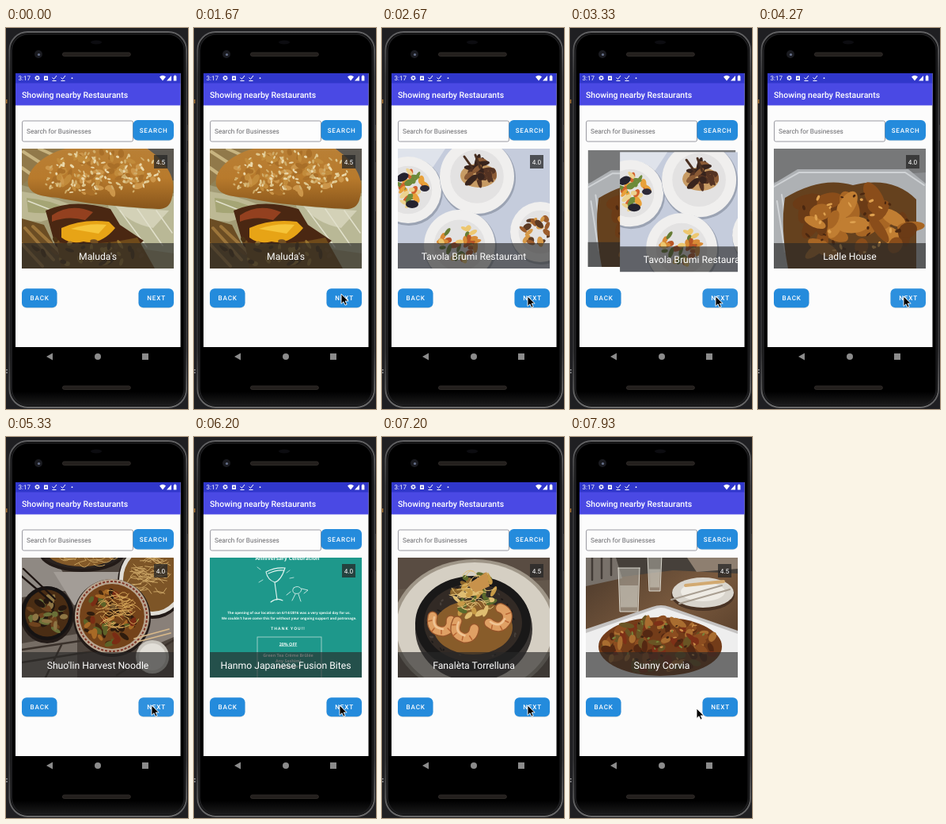
Animation, 230 px wide and 480 px high, one loop 8000 ms. Source, as an HTML page:

```html
<!DOCTYPE html>
<html lang="en">
<head>
<meta charset="utf-8">
<title>Nearby restaurants</title>
<style>
html, body { margin: 0; width: 100%; height: 100%; overflow: hidden; background: #1f1f22; }
svg { display: block; width: 230px; height: 480px; }
text { font-family: Roboto, Inter, sans-serif; text-rendering: geometricPrecision; }
.label { font-size: 8.1px; font-weight: 500; letter-spacing: .85px; fill: #fff; text-anchor: middle; }
.name { font-size: 12.2px; fill: #fff; text-anchor: middle; }
.rate { font-size: 8.2px; fill: #fff; text-anchor: middle; }
.flyer text { font-family: "Open Sans", sans-serif; font-weight: 700; fill: #eefaf6; text-anchor: middle; }
</style>
</head>
<body>
<svg viewBox="0 0 230 480">
  <defs>
    <clipPath id="list"><rect x="20" y="100" width="192" height="300"/></clipPath>
    <clipPath id="photo"><rect width="192" height="151"/></clipPath>
    <filter id="soft" x="0" y="0" width="1" height="1"><feGaussianBlur stdDeviation=".55"/></filter>
    <linearGradient id="bun" x2="0" y2="1">
      <stop stop-color="#b98036"/><stop offset=".5" stop-color="#b87a2c"/><stop offset="1" stop-color="#87551b"/>
    </linearGradient>
    <linearGradient id="wood" x2="1" y2="1">
      <stop stop-color="#48372a"/><stop offset=".5" stop-color="#7a5a3e"/><stop offset="1" stop-color="#4b3423"/>
    </linearGradient>
    <linearGradient id="rim" x2="0" y2="1">
      <stop stop-color="#626264"/><stop offset=".12" stop-color="#3b3b3d"/>
      <stop offset=".85" stop-color="#353537"/><stop offset="1" stop-color="#6a6a6b"/>
    </linearGradient>
    <linearGradient id="chin" x2="0" y2="1"><stop stop-color="#000"/><stop offset="1" stop-color="#1c1c1d"/></linearGradient>
  </defs>

  <rect width="230" height="480" fill="#1f1f22"/>
  <path d="M0 90h1.6v5h-1.6z" fill="#9a6a30"/>
  <path d="M0 430h2v1.5h-2zM0 433.5h2v1.5h-2z" fill="#8a8a8c"/>
  <path d="M227.5 122h2v20h-2zM227.5 169h2v62h-2z" fill="#48484b"/>
  <rect x="4.5" y="5" width="223.5" height="473" rx="23" fill="#000" stroke="url(#rim)" stroke-width="2"/>
  <path d="M7 458H226Q224 475 205 476H28Q9 475 7 458Z" fill="url(#chin)"/>
  <rect x="7" y="7.5" width="218.5" height="468" rx="21" fill="none" stroke="#1d1d1f" stroke-width="2"/>
  <ellipse cx="114" cy="18" rx="7" ry="2.5" fill="#0c0c10"/>
  <circle cx="41" cy="33" r="5" fill="#1a1b20"/><circle cx="41.5" cy="33.5" r="1.6" fill="#66718a"/>
  <g fill="#231f1d" stroke="#393431" stroke-width=".7">
    <rect x="71.4" y="30.9" width="86" height="4.6" rx="2.3"/><rect x="71.4" y="450.9" width="86" height="4.6" rx="2.3"/>
  </g>

  <rect x="12" y="57" width="208.5" height="345" fill="#fcfcfc"/>
  <rect x="12" y="57" width="208.5" height="13" fill="#3037cb"/>
  <rect x="12" y="69.5" width="208.5" height="28" fill="#4a49e4"/>
  <g fill="#fff">
    <text x="15.5" y="66.3" font-size="8">3:17</text>
    <circle cx="39.5" cy="63" r="2.1" fill="none" stroke="#fff" stroke-width="1.9" stroke-dasharray="1.6 .3"/>
    <path d="M48 60.5h5v5.5h-5zM49.5 62.2v2h2v-2z" fill-rule="evenodd"/>
    <path d="M58.5 62.5l2 2 3.5-4.5M58.5 66.5h5M69.5 62.5l2 2 3.5-4.5M69.5 66.5h5" fill="none" stroke="#fff"/>
    <circle cx="83.5" cy="63.2" r=".9"/>
    <path d="M194 61.5Q198 58 202 61.5L198 66.5zM203 66.5h6v-6.5zM211.8 60.5h1v-1h1.6v1h1v6h-3.6z"/>
    <text x="20" y="87.6" font-size="10.5" font-weight="500">Showing nearby Restaurants</text>
  </g>

  <rect x="20.5" y="117" width="140" height="26" rx="2" fill="#fdfdfd" stroke="#9a9aa2"/>
  <text x="26" y="133.2" font-size="8.25" fill="#68686c">Search for Businesses</text>
  <g id="buttons"></g>
  <g clip-path="url(#list)" id="cards"></g>

  <g fill="#8b8b8b">
    <path d="M51 414l8-4.5v9z"/><circle cx="116" cy="414" r="4"/><rect x="172" y="410" width="8" height="8"/>
  </g>
  <path id="cursor" d="M0 0V12.5L3 9.8L5 14.2L7.2 13.2L5.2 9H9.2Z" fill="#000" stroke="#fff" stroke-width=".9" stroke-linejoin="round"/>
</svg>
<script>
const $ = id => document.getElementById(id);
const LOOP = 8000, SWIPE = 200, W = 192, H = 151;

const ell = (x, y, rx, ry, fill, extra = '') =>
  `<ellipse cx="${x}" cy="${y}" rx="${rx}" ry="${ry}" fill="${fill}" ${extra}/>`;
const shape = (d, fill) => `<path d="${d}" fill="${fill}"/>`;
const line = (d, color, width) =>
  `<path d="${d}" fill="none" stroke="${color}" stroke-width="${width}" stroke-linecap="round"/>`;
const back = fill => `<rect width="${W}" height="${H}" fill="${fill}"/>`;
const random = seed => {
  let s = seed * 99991;
  return () => (s = s * 16807 % 2147483647) / 2147483647;
};

// Random points inside an ellipse, each drawn by one callback.
function scatter(seed, n, cx, cy, rx, ry, draw) {
  const r = random(seed);
  let out = '';
  for (let i = 0; i < n; i++) {
    const a = r() * 2 * Math.PI, d = Math.sqrt(r());
    out += draw(cx + rx * d * Math.cos(a), cy + ry * d * Math.sin(a), r, i);
  }
  return out;
}
const bits = (seed, n, cx, cy, rx, ry, size, colors) =>
  scatter(seed, n, cx, cy, rx, ry, (x, y, r, i) =>
    ell(x, y, size * (.6 + r() * .7), size * (.35 + r() * .3), colors[i % colors.length],
      `transform="rotate(${r() * 180} ${x} ${y})"`));
const strands = (seed, n, cx, cy, rx, ry, color) =>
  scatter(seed, n, cx, cy, rx, ry, (x, y, r) =>
    line(`M${x - 7} ${y + r() * 8 - 4}Q${x} ${y + r() * 24 - 12} ${x + 7} ${y + r() * 8 - 4}`, color, 1));
const plate = (x, y, rx, ry = rx) =>
  ell(x + 1, y + 2, rx + 1, ry + 1, '#9ba3b3') + ell(x, y, rx, ry, '#f0efee') + ell(x, y, rx * .72, ry * .72, '#e3e2e2');

const burger = () => back('#8f8156') +
  shape('M0 0H66L14 34L0 46Z', '#91794a') + line('M2 4L30 22M22 0L40 8M0 24L14 34', '#c8b480', 4) +
  shape('M150 0H192V40H165Z', '#5b5750') + line('M152 -2L168 12', '#a98a72', 6) +
  shape('M0 46L60 62L192 56V151H0Z', '#a39c76') +
  shape('M0 54Q30 58 60 70L52 84L24 92L0 90Z', '#bdb994') + shape('M6 62Q34 64 58 76Q36 84 8 80Z', '#a5a575') +
  shape('M108 68L192 60V132L150 126Q116 104 108 68Z', '#b9b896') +
  shape('M118 72Q150 76 186 78L166 100Q134 94 118 72Z', '#d3d1b7') +
  line('M124 78L158 124M146 76L178 122M170 78L190 106M8 66L44 80', '#e1e0cb', 1.5) +
  shape('M30 78Q66 62 112 76L124 96L154 116L140 128H44Z', '#4a2712') +
  shape('M38 84Q62 68 90 80L80 90Q58 84 38 92Z', '#93401f') +
  shape('M50 100Q76 88 110 92L118 100Q100 122 78 117Q62 121 50 112Z', '#e7a416') +
  shape('M62 101Q86 93 107 96L97 107Z', '#f6c53a') +
  shape('M0 88L28 96L56 151H0Z', '#6b4d24') + line('M4 100L40 140M14 98L50 132M0 120L26 148', '#9c753a', 4) +
  shape('M44 118Q90 124 146 112L168 151H50Z', '#6f4a1a') + bits(4, 35, 80, 132, 78, 20, 5, ['#4c3214', '#9a742f', '#755022']) +
  shape('M8 46C4 24 34 2 66 -2H154C178 10 194 34 191 52C190 68 186 76 172 76C136 74 82 70 46 62C24 60 12 58 8 46Z', 'url(#bun)') +
  bits(6, 80, 98, 30, 74, 26, 6, ['#c28b3b', '#a96f28', '#cc964a']) +
  bits(5, 125, 98, 31, 80, 28, 2.6, ['#dfc78e', '#d0ac69', '#ead8ab']);

const plates = () => back('#c5ccdc') +
  shape('M0 0H60L20 60H0Z', '#dfe3eb') + plate(13, 52, 42) + plate(100, 35, 47) + plate(78, 122, 45) + plate(180, 105, 38) +
  bits(7, 28, 18, 52, 20, 23, 6, ['#e8a13a', '#d2622c', '#ecd28e', '#6d8a3a']) +
  ell(6, 36, 8, 5, '#24222e', 'transform="rotate(-25 6 36)"') + ell(18, 70, 8, 5, '#24222e') +
  ell(34, 50, 6, 4, '#2c2937') +
  ell(102, 34, 23, 15, '#c79b64') + bits(8, 20, 104, 28, 22, 14, 8, ['#543323', '#38241d', '#8a5a35']) +
  line('M84 10L94 24M98 8L104 24', '#4a3021', 3) +
  bits(9, 32, 78, 118, 25, 22, 6, ['#d88b36', '#b95526', '#edc76f', '#667c33']) +
  bits(10, 18, 178, 104, 20, 18, 6, ['#9b5c2c', '#d69a49', '#5b3a24']);

const chicken = () => back('#8b8d90') +
  shape('M0 0H192V30L0 42Z', '#777879') + shape('M0 44L30 26H170L192 44V151H0Z', '#aeb1b4') +
  line('M0 48L32 30H166L190 46M4 66L14 130M10 58L22 140', '#d0d3d6', 2) +
  shape('M14 62Q60 34 100 46Q150 34 180 64V151H18Q8 100 14 62Z', '#65411e') +
  bits(12, 34, 98, 96, 76, 42, 17, ['#a86624', '#8a4d1a', '#c17e32', '#6b3b16']) +
  bits(13, 40, 98, 92, 72, 42, 3, ['#dea14f', '#4a2710']);

const bowl = (x, y, rx, ry, rim, soup) =>
  ell(x, y + 2, rx + 2, ry + 2, '#221a17') + ell(x, y, rx, ry, rim) + ell(x, y, rx * .87, ry * .87, soup);
const noodles = () => back('#4d443d') +
  shape('M0 0H40L66 40L0 50Z', '#8f8983') + shape('M40 18H130L120 40L66 60Z', '#a39d97') +
  shape('M0 108L70 96V151H0Z', '#766d65') + shape('M128 72L192 66V100L150 118Z', '#898079') +
  line('M0 116L80 104M0 132L90 118M30 151L50 110M120 148L192 104', '#3a312b', 2.5) +
  bowl(76, -8, 52, 22, '#2a2320', '#845a29') + strands(21, 24, 82, -1, 34, 9, '#c7a05e') +
  bowl(165, 28, 42, 45, '#e0ddd6', '#4a3423') +
  ell(165, 28, 37, 40, '#7d5527') + strands(22, 55, 163, 24, 23, 27, '#cba565') +
  bowl(32, 70, 32, 34, '#161313', '#4a2d14') +
  bits(23, 36, 32, 72, 22, 24, 6, ['#24170f', '#6f431e', '#6a7038', '#8d7544']) +
  line('M2 14L42 52M-2 22L38 56', '#1c1310', 2.4) +
  bowl(114, 74, 47, 47, '#b8a48f', '#74431a') +
  ell(114, 74, 44, 44, 'none', 'stroke="#803526" stroke-width="2" stroke-dasharray="3 2"') +
  bits(24, 55, 110, 76, 34, 34, 6, ['#44270f', '#a86a26', '#5d6228', '#7a2c14', '#2f1c0e']) +
  strands(25, 60, 122, 68, 22, 24, '#d0a156') +
  line('M142 102L186 90M146 106L188 95', '#d9b98a', 1.7) + ell(165, 125, 21, 21, '#c9c5bd') + ell(165, 125, 17, 17, '#e2dfd8');

const flyerText = (x, y, size, text, extra = '') => `<text x="${x}" y="${y}" font-size="${size}" ${extra}>${text}</text>`;
const flyer = () => `<g class="flyer">` + back('#1e988b') +
  flyerText(98, 3.2, 6.7, 'Anniversary Celebration') +
  line('M71 18Q82 12 95 13Q90 29 82 31Q73 28 71 18M74 20Q84 15 93 16M82 31L85 53M77 56Q85 50 92 54', '#e6f6f2', 1.1) +
  line('M97 19l4-3M101 26l5-1M64 15l-4-3M67 28l-5 3', '#e6f6f2', .7) +
  line('M106 38q6-4 10 2q-2 7-9 5q-4-3-1-7M116 39l8 2l-5 4M108 46l-4 8M112 46l3 9M102 43l-5 4', '#d7eee9', .9) +
  flyerText(100, 70.5, 4.45, 'The opening of our location on 6/14/2016 was a very special day for us.') +
  flyerText(100, 77.8, 4.45, 'We couldn\'t have come this far without your ongoing support and patronage.') +
  flyerText(99, 91, 5, 'THANK YOU!!', 'letter-spacing="1"') +
  `<rect x="60" y="100" width="81" height="60" fill="none" stroke="#b8ddd5" stroke-width=".8"/>` +
  flyerText(99, 110.5, 5.4, '20% OFF', 'text-decoration="underline"') +
  flyerText(99, 125, 5.3, 'Green Tea Crème Brûlée') + flyerText(99, 132, 5.3, 'Any Sashimi') +
  flyerText(99, 139, 5.3, 'Any Dessert') + '</g>';

const prawn = (x, y, turn) => `<g transform="translate(${x} ${y}) rotate(${turn})">` +
  line('M-11 -9Q-15 9 2 10Q13 8 12 -4', '#96542a', 13) + line('M-11 -9Q-15 9 2 10Q13 8 12 -4', '#dfa064', 10.5) +
  line('M-12 -4l-4 1M-9 6l-3 4M0 8v5M8 6l4 4', '#b96634', 1.5) + line('M-9 -8Q-12 6 2 7', '#f0c494', 2.5) + '</g>';
const skillet = () => back('#63574b') +
  shape('M0 0H192V28L0 40Z', '#594c42') + ell(97, 88, 104, 86, '#9f9688') + ell(97, 88, 99, 82, '#d5cfc3') +
  ell(96, 90, 74, 66, '#3a3634') + ell(95, 83, 73, 60, '#191818') + ell(95, 82, 62, 49, '#322a25') +
  bits(31, 70, 95, 84, 62, 50, 2, ['#48403a', '#1d1a19']) + ell(95, 88, 50, 34, '#885c2a') +
  prawn(55, 83, 0) + prawn(84, 91, 12) + prawn(128, 76, -65) +
  bits(32, 45, 96, 46, 28, 28, 6, ['#c79a47', '#8d662b', '#dfbd70', '#5b6a2c']) +
  strands(33, 30, 96, 44, 25, 24, '#e0c078') + shape('M88 34L112 18L116 36L98 44Z', '#c8924b');

const tumbler = (x, y, w, h) => shape(`M${x} ${y}h${w}l-2 ${h}h${4 - w}Z`, '#b7b4ab88') +
  shape(`M${x + 2} ${y + h * .4}h${w - 4}l-1 ${h * .5}h${6 - w}Z`, '#e6e5dc66') +
  line(`M${x} ${y}h${w}M${x} ${y}l2 ${h}h${w - 4}l2 ${-h}`, '#e9e7dd', .9);
const supper = () => back('url(#wood)') +
  shape('M0 0H192V20L110 16L0 30Z', '#46403a') + shape('M0 0H38L46 26L0 36Z', '#78716a') +
  line('M8 0v28M20 0v26M32 0v22', '#403a35', 2.5) + shape('M128 0H192V14L140 18Z', '#8e7f70') +
  tumbler(78, -4, 18, 46) + tumbler(41, 13, 27, 55) +
  ell(148, 47, 40, 20, '#4a3425') + ell(148, 44, 39, 19, '#d9d5cd') + ell(148, 43, 28, 12, '#eeebe4') +
  line('M108 53L172 35M118 58L182 40', '#a99f92', 2) + line('M126 35L174 30', '#d2a970', 4) +
  shape('M0 90L84 62Q95 58 106 62L192 92V151H0Z', '#c4c2c1') +
  shape('M0 95L86 65Q95 61 104 65L192 96V151H0Z', '#eeeeee') +
  ell(94, 112, 78, 37, '#733c19') +
  bits(41, 95, 94, 110, 72, 33, 8, ['#8c4d20', '#542812', '#a96d30', '#6a5424', '#7d3017']) +
  bits(42, 45, 94, 106, 66, 28, 2.2, ['#c98d48', '#3f2412', '#788039']);

// The start is the moment the card begins to leave.
const deck = [
  { name: 'Maluda\'s', rate: '4.5', draw: burger, start: 2200 },
  { name: 'Tavola Brumi Restaurant', rate: '4.0', draw: plates, start: 3264 },
  { name: 'Ladle House', rate: '4.0', draw: chicken, start: 4310 },
  { name: 'Shuo\'lin Harvest Noodle', rate: '4.0', draw: noodles, start: 5360 },
  { name: 'Hanmo Japanese Fusion Bites', rate: '4.0', draw: flyer, start: 6420 },
  { name: 'Fanalèta Torrelluna', rate: '4.5', draw: skillet, start: 7380 },
  { name: 'Sunny Corvia', rate: '4.5', draw: supper, start: Infinity }
];
$('cards').innerHTML = deck.map((c, i) => `<g id="card${i}"><g clip-path="url(#photo)">
  <g ${c.draw === flyer ? '' : 'filter="url(#soft)"'}>${c.draw()}</g></g>
  <rect y="119" width="${W}" height="32" fill="#282828" opacity=".64"/>
  <rect x="167" y="8" width="17" height="17" fill="#262626" opacity=".75"/>
  <text class="rate" x="175.5" y="19.6">${c.rate}</text>
  <text class="name" x="96" y="139.6">${c.name}</text></g>`).reverse().join('');

const button = (x, y, w, h, label, id) =>
  `<rect x="${x}" y="${y + .7}" width="${w}" height="${h}" rx="6" fill="#000" opacity=".12"/>
  <rect x="${x}" y="${y}" width="${w}" height="${h}" rx="6" fill="#248bdc"/>
  <rect id="${id}" x="${x}" y="${y}" width="${w}" height="${h}" rx="6" fill="#fff" opacity="0"/>
  <text class="label" x="${x + w / 2 + .4}" y="${y + h / 2 + 3}">${label}</text>`;
$('buttons').innerHTML = button(160.5, 116, 51.5, 25.5, 'SEARCH', 'search') +
  button(20, 328.3, 44.5, 24, 'BACK', 'back') + button(167.5, 328.3, 44.5, 24, 'NEXT', 'next');

const clamp = v => Math.max(0, Math.min(1, v));
const cards = deck.map((c, i) => $('card' + i));
const path = [[720, 205, 482], [1500, 186, 335], [1930, 186, 335], [2060, 184, 338], [7560, 184, 338], [7880, 160, 342]];

function cursorAt(t) {
  let [, x, y] = path[0];
  for (let i = 1; i < path.length; i++) {
    const [t0] = path[i - 1], [t1, x1, y1] = path[i];
    const u = clamp((t - t0) / (t1 - t0)), s = u * u * (3 - 2 * u);
    x += (x1 - x) * s;
    y += (y1 - y) * s;
  }
  return `translate(${x} ${y})`;
}

function render(t) {
  let reveal = 1, glow = 0;
  deck.forEach((c, i) => {
    const u = clamp((t - c.start) / SWIPE), dx = 2 * W * u * u, dy = H / 4 * u * u;
    const k = .95 + .05 * reveal;
    cards[i].setAttribute('transform',
      `translate(${20 + dx + W / 2 * (1 - k)} ${152 + dy + H / 2 * (1 - k)}) scale(${k})`);
    cards[i].setAttribute('visibility', dx < W && (i === 0 || t >= deck[i - 1].start) ? 'visible' : 'hidden');
    reveal = Math.min(1, dx / (W / 2));
    const press = t - c.start + 90;
    if (press > 0 && press < 340) glow = .06 * Math.min(1, press / 70, (340 - press) / 200);
  });
  $('next').setAttribute('opacity', glow);
  $('cursor').setAttribute('transform', cursorAt(t));
}

const begin = performance.now();
function tick() {
  render((performance.now() - begin) % LOOP);
  requestAnimationFrame(tick);
}
tick();
</script>
</body>
</html>
```
